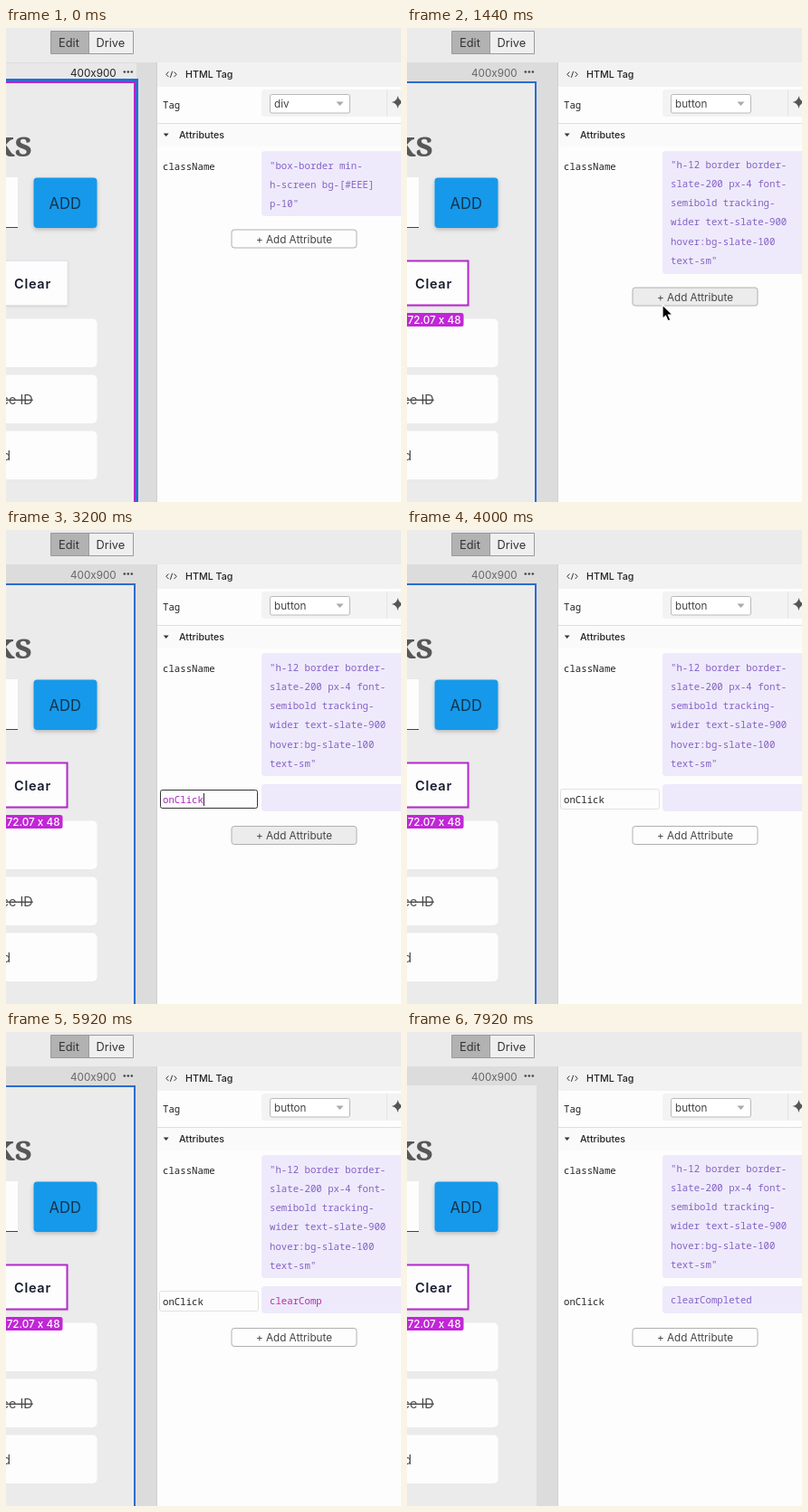
Animation of 436 by 524 pixels, one loop 8 s. Source, as an HTML page:

```html
<!DOCTYPE html>
<html lang="en">
<head>
<meta charset="utf-8">
<title>Attribute editor</title>
<style>
html, body { margin: 0; width: 100%; height: 100%; overflow: hidden; background: #ebebeb; }
svg { display: block; }
text { font: 11.7px Inter, sans-serif; fill: #444; white-space: pre; }
.small { font-size: 10.7px; font-weight: 500; fill: #222; }
.tool { font-size: 12.8px; fill: #333; }
.code { font: 10.7px "Noto Sans Mono", monospace; fill: #222; }
.str text, .str { fill: #8561c5; }
.task { font-size: 14.4px; fill: #4a4a4a; text-anchor: end; }
.line { fill: none; stroke-width: 2; }
.purple { stroke: #b528cc; }
.blue { stroke: #2b6cd0; }
</style>
</head>
<body>
<svg width="436" height="524" viewBox="0 0 436 524">
  <defs>
    <filter id="shade" x="-20%" y="-20%" width="140%" height="150%">
      <feDropShadow dx="0" dy="2" stdDeviation="2" flood-opacity=".22"/>
    </filter>
    <filter id="soft" x="-20%" y="-20%" width="140%" height="150%">
      <feDropShadow dx="0" dy="1" stdDeviation="1" flood-opacity=".12"/>
    </filter>
  </defs>

  <!-- canvas -->
  <rect width="436" height="524" fill="#ebebeb"/>
  <rect y="38" width="166" height="486" fill="#dcdcdc"/>
  <rect id="head" y="39" width="144" height="19" fill="#e8e8e8"/>
  <rect y="59" width="143" height="465" fill="#ebebeb"/>
  <text id="size" x="71" y="54">400x900</text>
  <g fill="#444"><circle cx="130.8" cy="48.5" r="1.3"/><circle cx="134.8" cy="48.5" r="1.3"/><circle cx="138.8" cy="48.5" r="1.3"/></g>

  <!-- toolbar -->
  <rect x="49.5" y="3.5" width="91" height="25" rx="1" fill="#efefef"/>
  <rect x="49.5" y="3.5" width="42" height="25" fill="#b2b2b2"/>
  <path d="M49.5 3.5h91v25h-91zM91.5 3.5v25" fill="none" stroke="#9a9a9a"/>
  <text class="tool" x="58" y="21">Edit</text>
  <text class="tool" x="99.5" y="21">Drive</text>

  <!-- task app -->
  <text x="29" y="142" text-anchor="end" style="font:600 40px 'Noto Serif',serif;fill:#575757">ks</text>
  <rect x="-4" y="165" width="17" height="56" fill="#fdfdfd"/>
  <path d="M0 220.5h13" stroke="#444"/>
  <rect x="30.5" y="165.5" width="70" height="55.5" rx="4" fill="#1899ea" filter="url(#shade)"/>
  <text x="65.2" y="200" text-anchor="middle" style="font-size:16.6px;fill:#12344d">ADD</text>
  <rect id="clear" x="-10" y="257.5" width="78" height="49" stroke="#e0e4ea" filter="url(#soft)"/>
  <text x="9" y="287.5" style="font-size:14.5px;font-weight:600;letter-spacing:.05em;fill:#151b2c">Clear</text>
  <g fill="#fdfdfd">
    <rect x="-10" y="321.5" width="110.5" height="53.5" rx="5"/>
    <rect x="-10" y="383.5" width="110.5" height="53.5" rx="5"/>
    <rect x="-10" y="445.5" width="110.5" height="53.5" rx="5"/>
  </g>
  <text class="task" x="29.7" y="416" text-decoration="line-through">ce ID</text>
  <text class="task" x="5" y="478">d</text>
  <path id="frameHover" class="line blue" style="stroke-width:3" d="M0 57.5H144.5V524"/>
  <path id="frame" class="line" d="M0 60H142V524"/>
  <path id="ring" class="line" d="M0 257.5H67.5V306.5H0"/>
  <g id="badge">
    <rect x="-5" y="315" width="67.5" height="15" rx="2.5" fill="#c127d6"/>
    <text x="59.5" y="327" text-anchor="end" style="font-weight:500;fill:#fff">72.07 x 48</text>
  </g>

  <!-- panel -->
  <rect x="166" y="38" width="270" height="486" fill="#fdfdfd"/>
  <rect x="166" y="38" width="270" height="27" fill="#f2f2f2"/>
  <path d="M166.5 38v486" stroke="#d0d0d0"/>
  <path d="M179.5 48.5l-2.7 2.8 2.7 2.8M185.5 48.5l2.7 2.8-2.7 2.8M183.6 47.8l-2.2 7" fill="none" stroke="#333"/>
  <text class="small" x="198" y="55.4">HTML Tag</text>
  <text class="code" x="173" y="89">Tag</text>
  <rect x="282" y="68" width="160" height="30" rx="4" fill="#f3f3f3"/>
  <path d="M420.5 68v30" stroke="#e4e4e4"/>
  <rect x="291.5" y="73.500" width="88" height="20.500" rx="2" fill="#fff" stroke="#b9b9b9"/>
  <text id="tag" x="296" y="88"></text>
  <path d="M364.500 81.500h8l-4 4.500z" fill="#aaa"/>
  <path d="M432.500 75q1 6 7 7-6 1-7 7-1-6-7-7 6-1 7-7z" fill="#555"/>
  <rect x="167" y="105" width="269" height="26" fill="#fafafa"/>
  <path d="M167 105.500h269" stroke="#dedede"/>
  <path d="M173.800 116.500h5.800l-2.900 3.600z" fill="#333"/>
  <text class="small" x="191" y="122">Attributes</text>
  <text class="code" x="173" y="157">className</text>
  <rect id="valueBox" x="282" y="136" width="160" rx="4" fill="#eeeafb"/>
  <g id="value" class="str"></g>
  <g id="row">
    <rect id="keyBox" rx="2" fill="#fdfdfd"/>
    <text id="key" class="code" x="173" y="302"></text>
    <path id="caret" stroke="#222"/>
    <rect x="282" y="281" width="160" height="30" rx="4" fill="#eeeafb"/>
    <text id="handler" class="code" x="291"></text>
  </g>
  <g id="add">
    <rect id="addBox" x="249" y=".5" width="138" height="20" rx="3" stroke="#b0b0b0"/>
    <text x="318" y="15" text-anchor="middle">+ Add Attribute</text>
  </g>

  <path id="cursor" d="M0 0V15.500L3.500 12.200 6.100 18 8.900 16.800 6.400 11.200H11.200Z" fill="#000" stroke="#fff" stroke-width="1.200"/>
</svg>
<script>
const STEP = 80, LOOP = 8000, CHAR = 6.42;
const SELECT = 1040, ADD = 1600, TYPE_KEY = 1920, KEY_DONE = 3680,
      TYPE_VALUE = 4720, COMMIT = 7200, BLUR = 7680;
const DIV = ['"box-border min-', 'h-screen bg-[#EEE]', 'p-10"'];
const BUTTON = ['"h-12 border border-', 'slate-200 px-4 font-', 'semibold tracking-',
                'wider text-slate-900', 'hover:bg-slate-100', 'text-sm"'];
// time, x, y
const PATH = [[320, -16, 60], [720, 31, 283], [960, 31, 283], [1440, 282, 306], [TYPE_KEY, 282, 306]];

const $ = id => document.getElementById(id);
const show = (id, on) => $(id).setAttribute('display', on ? 'inline' : 'none');
const set = (id, attrs) => { for (const k in attrs) $(id).setAttribute(k, attrs[k]); };
const ease = p => p * p * (3 - 2 * p);
const typed = (word, t, start, gap) =>
  word.slice(0, Math.max(0, Math.floor((t - start) / gap) + 1));

function cursorAt(t) {
  for (let i = 1; i < PATH.length; i++) {
    const [t0, x0, y0] = PATH[i - 1], [t1, x1, y1] = PATH[i];
    if (t >= t0 && t < t1) {
      const p = ease((t - t0) / (t1 - t0));
      return [x0 + (x1 - x0) * p, y0 + (y1 - y0) * p];
    }
  }
  return null;
}

function drawCursor(pos) {
  show('cursor', pos);
  if (pos) set('cursor', { transform: `translate(${pos[0]} ${pos[1]})` });
}

function drawCanvas(t, selected, overClear) {
  const headHover = t < 400;
  show('head', headHover);
  show('frameHover', headHover);
  $('size').style.fill = headHover ? '#222' : '#666';
  show('frame', t < BLUR);
  set('frame', { class: 'line ' + (selected ? 'blue' : 'purple') });
  show('ring', selected || overClear);
  set('ring', { class: 'line ' + (selected ? 'purple' : 'blue') });
  set('clear', { fill: overClear ? '#eff3f8' : '#fdfdfd' });
  show('badge', selected);
}

function drawValue(t, selected) {
  const lines = selected ? BUTTON : DIV;
  const lift = selected && (t < TYPE_KEY || t >= COMMIT) ? 1 : 0;
  $('tag').textContent = selected ? 'button' : 'div';
  set('valueBox', { height: selected ? 136 : 72 });
  $('value').innerHTML = lines.map((s, i) =>
    `<text class="code str" x="291" y="${155.5 - lift + i * 21.3}">${s}</text>`).join('');
}

function drawRow(t) {
  show('row', t >= ADD);
  const editing = t < KEY_DONE, done = t >= COMMIT;
  const key = typed('onClick', t, TYPE_KEY, 160);
  $('key').textContent = key;
  $('key').style.fill = editing ? '#a626b8' : '#222';
  set('keyBox', editing
    ? { x: 170.5, y: 287.5, width: 107, height: 20, stroke: '#333' }
    : { x: 169.5, y: 286.5, width: 109, height: 22, stroke: done ? 'none' : '#e2e2e2' });
  show('caret', editing);
  const x = 173.5 + key.length * CHAR;
  set('caret', { d: `M${x} 291v14` });
  $('handler').textContent = typed('clearCompleted', t, TYPE_VALUE, 150);
  $('handler').style.fill = done ? '#8561c5' : '#bd2aae';
  set('handler', { y: done ? 300 : 301 });
}

function draw(now) {
  const t = Math.floor((now % LOOP) / STEP) * STEP;
  const selected = t >= SELECT, pos = cursorAt(t);
  const overClear = !!pos && pos[0] < 68 && pos[1] > 257 && pos[1] < 307;
  drawCanvas(t, selected, overClear);
  drawValue(t, selected);
  drawRow(t);
  set('add', { transform: `translate(0 ${t >= ADD ? 327 : selected ? 286.5 : 222.5})` });
  set('addBox', { fill: t >= 1360 && t < KEY_DONE ? '#ececec' : '#fdfdfd' });
  drawCursor(pos);
}

const start = performance.now();
function tick() {
  draw(performance.now() - start);
  requestAnimationFrame(tick);
}
tick();
</script>
</body>
</html>
```
